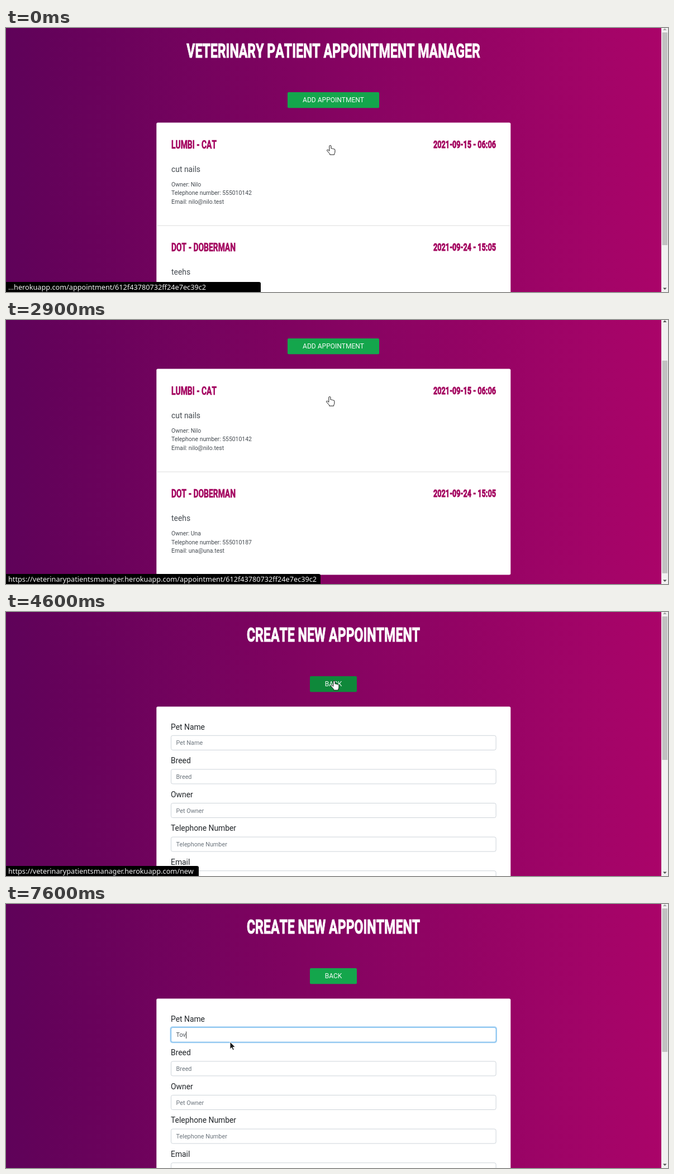
Animation, 1185 px wide and 473 px high, one loop 8 s. Source, as an HTML page:

```html
<!DOCTYPE html>
<html lang="en">
<head>
<meta charset="utf-8">
<title>Appointment manager</title>
<style>
html, body { margin: 0; width: 100%; height: 100%; overflow: hidden; }
svg { display: block; width: 1185px; height: 473px; }
text { font-family: Roboto, sans-serif; white-space: pre; }
.head { font-weight: 700; font-kerning: none; stroke-width: .03em; }
.date { stroke-width: .05em; }
.url { font-family: "Noto Sans", sans-serif; font-size: 12.7px; fill: #f4f4f4; }
</style>
</head>
<body>
<svg id="stage" viewBox="0 0 1185 473">
  <defs>
    <linearGradient id="bg">
      <stop offset="0" stop-color="#5f0259"/>
      <stop offset="1" stop-color="#aa0469"/>
    </linearGradient>
  </defs>
  <rect width="1173" height="473" fill="url(#bg)"/>
  <g id="list"></g>
  <g id="form"></g>
  <rect x="1173" width="12" height="473" fill="#f1f1f1"/>
  <rect id="thumb" x="1174.5" width="9.5" fill="#c1c1c1"/>
  <path id="up" d="M1179.3 .5l3.3 3.5h-6.6z"/>
  <path id="down" d="M1179.3 469l3.3-3.5h-6.6z"/>
  <g id="status">
    <path id="plate" fill="#000"/>
    <text id="url" class="url" x="4" y="468.5"></text>
  </g>
  <g id="cursor" stroke-linejoin="round">
    <path id="hand" fill="#fff" stroke="#1c1c1c" d="M-3.2 1V-6q0-1.7 1.6-1.7T0-6v3.8q1.4-.5 2.4.5 1.4-.5 2.3.6 2.2-.3 2.2 1.7V4q0 1.5-1.2 3.4V9H-2.4V7.4L-7.2 2q-.9-1.5.5-2 1.2-.3 3.5 2.3z"/>
    <g id="beam" fill="none">
      <path d="M-2.5-5.5H-.6L0-5l.6-.5h1.9M0-5V5M-2.5 5.5H-.6L0 5l.6.5h1.9" stroke="#fff" stroke-width="2.6"/>
      <path d="M-2.5-5.5H-.6L0-5l.6-.5h1.9M0-5V5M-2.5 5.5H-.6L0 5l.6.5h1.9" stroke="#222" stroke-width="1.2"/>
    </g>
    <path id="arrow" fill="#1a1a1a" stroke="#fff" stroke-width=".9" d="M0 0V13l3-2.7 2.1 4.7 2.2-1-2-4.5H9.4z"/>
  </g>
</svg>
<script>
const LOOP = 8000, STEP = 100;
const CONDENSE = 0.668;
const PINK = '#a3045f', GREEN = [20, 166, 76], DARK_GREEN = [15, 136, 58];
const HOST = 'herokuapp.com/';
const ITEM = 'appointment/612f43780732ff24e7ec39c2';
const SITE = 'https://veterinarypatientsmanager.' + HOST;
const $ = id => document.getElementById(id);

function add(parent, tag, attrs, content) {
  const el = document.createElementNS('http://www.w3.org/2000/svg', tag);
  for (const k in attrs) el.setAttribute(k, attrs[k]);
  if (content) el.textContent = content;
  return parent.appendChild(el);
}

const label = (g, x, y, size, fill, content, anchor = 'start') =>
  add(g, 'text', { x, y, fill, 'font-size': size, 'text-anchor': anchor }, content);

const heading = (g, x, y, size, fill, content, anchor, extra = '') =>
  add(g, 'text', {
    class: 'head ' + extra, fill, stroke: fill, 'font-size': size, 'text-anchor': anchor,
    transform: `translate(${x} ${y}) scale(${CONDENSE} 1)`
  }, content);

function header(g, title, caption, width) {
  heading(g, 586, 53.3, 34.7, '#fff', title, 'middle');
  const button = add(g, 'rect', { x: 586 - width / 2, y: 115, width, height: 28.3, rx: 2 });
  label(g, 586, 133, 12.05, '#f4fbf6', caption, 'middle');
  add(g, 'rect', { x: 269.3, y: 169.6, width: 634, height: 369, rx: 2.5, fill: '#fff' });
  return button;
}

function appointment(y, pet, date, symptom, owner, phone, email) {
  const g = add($('list'), 'g', { transform: `translate(0 ${y})` });
  heading(g, 296, 46.3, 20.8, PINK, pet, 'start');
  heading(g, 877, 45.3, 19, PINK, date, 'end', 'date');
  label(g, 296, 88, 13.88, '#454b51', symptom);
  ['Owner: ' + owner, 'Telephone number: ' + phone, 'Email: ' + email]
    .forEach((line, i) => label(g, 296, 114 + i * 15.6, 10.41, '#454b51', line));
}

const addButton = header($('list'), 'VETERINARY PATIENT APPOINTMENT MANAGER', 'ADD APPOINTMENT', 164);
appointment(169.6, 'LUMBI - CAT', '2021-09-15 - 06:06', 'cut nails', 'Nilo', '555010142', 'nilo@nilo.test');
add($('list'), 'path', { d: 'M269.3 354H903.3', stroke: '#dcdcdc' });
appointment(354, 'DOT - DOBERMAN', '2021-09-24 - 15:05', 'teehs', 'Una', '555010187', 'una@una.test');

const backButton = header($('form'), 'CREATE NEW APPOINTMENT', 'BACK', 84);
const glow = add($('form'), 'rect', {
  x: 295, y: 220.8, width: 582.5, height: 27, rx: 3, fill: 'none', stroke: '#a9d4f5', 'stroke-width': 3
});
const fields = [['Pet Name'], ['Breed'], ['Owner', 'Pet Owner'], ['Telephone Number'], ['Email']]
  .map(([name, hint = name], i) => {
    const y = 221.3 + i * 60.6;
    label($('form'), 295, y - 10.8, 13.88, '#212529', name);
    const box = add($('form'), 'rect', {
      x: 295.5, y, width: 581.6, height: 26, rx: 3, fill: '#fff', stroke: '#ced4da'
    });
    return { box, text: label($('form'), 304.6, y + 17, 10.82, '#6c757d', hint) };
  });
const caret = add($('form'), 'rect', { y: 228.5, width: 1, height: 12.5, fill: '#333' });

// Linear interpolation through rows of [time, ...values]
function track(rows, t) {
  const i = rows.findIndex(r => r[0] > t);
  if (i === 0) return rows[0].slice(1);
  if (i < 0) return rows[rows.length - 1].slice(1);
  const a = rows[i - 1], b = rows[i], k = (t - a[0]) / (b[0] - a[0]);
  return a.slice(1).map((v, j) => v + (b[j + 1] - v) * k);
}

const SCROLL = [
  [1000, 0], [1100, 1], [1200, 8], [1300, 30], [1500, 76], [1600, 87], [1700, 91],
  [2800, 91], [2900, 82], [3000, 56], [3100, 26], [3200, 5], [3300, 5], [3400, 0]
];
const POINTER = [
  [0, 582, 218], [100, 582, 212], [300, 583, 175], [500, 583, 145], [700, 582, 130],
  [1100, 582, 130], [1700, 581, 145], [3300, 581, 145], [3400, 583, 152], [3700, 589, 148],
  [4100, 589, 131], [4800, 589, 131], [5200, 455, 212], [5400, 401, 240],
  [5500, 401, 240], [5600, 401, 243], [5700, 401, 246], [5800, 401, 247]
];
const HOVER = [[400, 0], [600, 1], [1200, 1], [1400, 0], [3700, 0], [3900, 1], [4900, 1], [5100, 0]];
const FOCUS = [[5500, 0], [5800, 1]];
const TYPED = [[7600, 'Tov'], [7400, 'To'], [7100, 'T']];

const mix = (a, b, k) => `rgb(${a.map((v, i) => Math.round(v + (b[i] - v) * k))})`;
const show = (el, on) => el.setAttribute('visibility', on ? 'visible' : 'hidden');

function drawStatus(t) {
  let url = SITE + ITEM, width = 563;
  if (t < 500 || (t >= 1400 && t < 1600)) [url, width] = ['…' + HOST + ITEM, 456];
  else if (t < 1400 || t >= 3500) [url, width] = [SITE + 'new', 345];
  $('url').textContent = url;
  $('plate').setAttribute('d', `M0 455H${width - 3}q3 0 3 3V473H0z`);
  $('status').setAttribute('display', t < 5200 ? 'inline' : 'none');
}

function drawCursor(t) {
  const [x, y] = track(POINTER, t);
  let kind = 'hand';
  if (t >= 5700 || (t >= 5000 && t < 5300)) kind = 'arrow';
  else if (t >= 5300) kind = 'beam';
  for (const id of ['hand', 'beam', 'arrow']) $(id).setAttribute('display', id === kind ? 'inline' : 'none');
  $('cursor').setAttribute('transform', `translate(${x} ${y})`);
}

function drawField(t) {
  const [focus] = track(FOCUS, t);
  const { box, text } = fields[0];
  const typed = (TYPED.find(r => t >= r[0]) || [])[1];
  box.setAttribute('stroke', mix([206, 212, 218], [112, 182, 235], focus));
  glow.setAttribute('opacity', focus);
  text.textContent = typed || 'Pet Name';
  text.setAttribute('fill', typed ? '#495057' : '#6c757d');
  const blinkOn = t >= 5700 && !(t >= 6300 && t < 6700);
  caret.setAttribute('x', typed ? 304.8 + text.getComputedTextLength() : 305);
  caret.setAttribute('display', blinkOn ? 'inline' : 'none');
}

function draw(time) {
  const t = Math.floor(time % LOOP / STEP) * STEP;
  const onForm = t >= 4600;
  const [scroll] = track(SCROLL, t);
  const fill = mix(GREEN, DARK_GREEN, track(HOVER, t)[0]);
  $('list').setAttribute('display', onForm ? 'none' : 'inline');
  $('form').setAttribute('display', onForm ? 'inline' : 'none');
  $('list').setAttribute('transform', `translate(0 ${-scroll})`);
  addButton.setAttribute('fill', fill);
  backButton.setAttribute('fill', fill);
  $('thumb').setAttribute('y', 8 + scroll * 0.79);
  $('thumb').setAttribute('height', onForm ? 257 : 381);
  $('up').setAttribute('fill', scroll > 0 ? '#505050' : '#a3a3a3');
  $('down').setAttribute('fill', scroll < 91 ? '#505050' : '#a3a3a3');
  drawStatus(t);
  drawCursor(t);
  if (onForm) drawField(t);
}

const start = performance.now();
function tick() {
  draw(performance.now() - start);
  requestAnimationFrame(tick);
}
tick();
</script>
</body>
</html>
```
